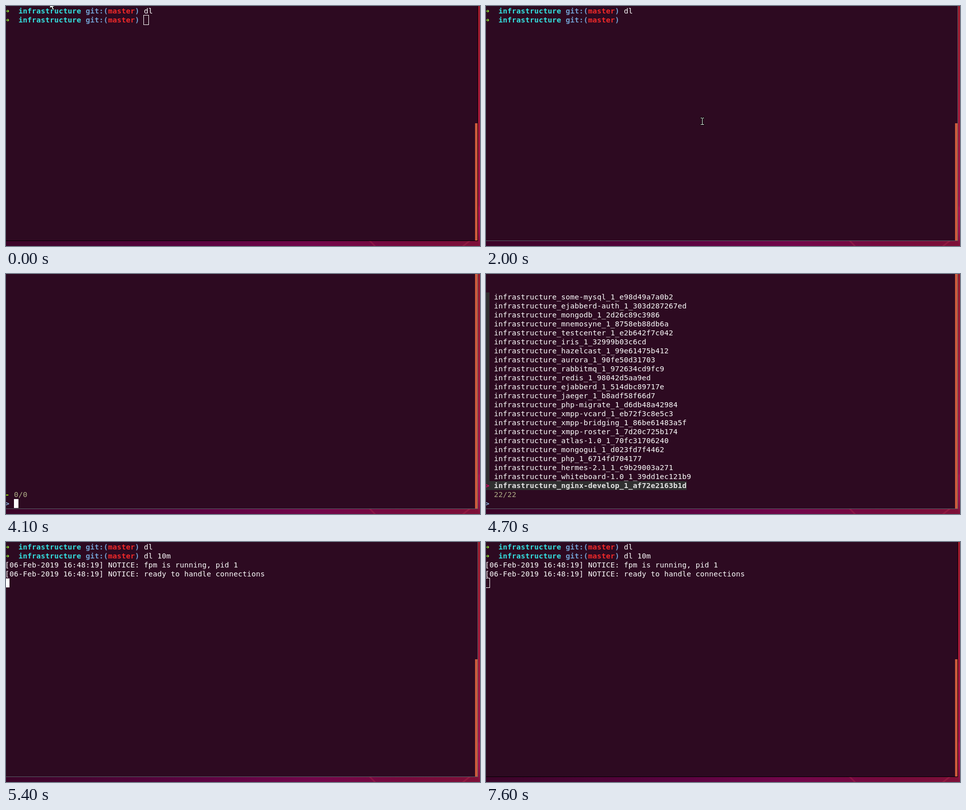
An HTML page with a canvas for the animation above (7900 ms loop, 952 by 481 pixels).

```html
<!DOCTYPE html>
<html lang="en">
<head>
<meta charset="utf-8">
<title>Terminal session</title>
<style>
  html, body { margin: 0; width: 100%; height: 100%; overflow: hidden; background: #2d0a21; }
  canvas { display: block; }
</style>
</head>
<body>
<canvas id="stage" width="952" height="481"></canvas>
<script>
const ctx = document.getElementById('stage').getContext('2d');
const LOOP = 7900, STEP = 100;
const CELL = 9, ROW = 18, LEFT = -2, TOP = 1;
const FONT = '14.667px "DejaVu Sans Mono", "DejaVu Sans", monospace';
const BG = '#2d0a21', WHITE = '#ffffff', GREY = '#303030';
const GREEN = '#8ae234', CYAN = '#34e2e2', BLUE = '#729fcf', RED = '#ef2929';
const PREFIX = 'infrastructure_';

// Nearest match comes first; the list grows upwards.
const containers = `nginx-develop_1_af72e2163b1d
whiteboard-1.0_1_39dd1ec121b9
hermes-2.1_1_c9b29003a271
php_1_6714fd704177
mongogui_1_d023fd7f4462
atlas-1.0_1_70fc31706240
xmpp-roster_1_7d20c725b174
xmpp-bridging_1_86be61483a5f
xmpp-vcard_1_eb72f3c8e5c3
php-migrate_1_d6db48a42984
jaeger_1_b8adf58f66d7
ejabberd_1_514dbc89717e
redis_1_98042d5aa9ed
rabbitmq_1_972634cd9fc9
aurora_1_90fe50d31703
hazelcast_1_99e61475b412
iris_1_32999b03c6cd
testcenter_1_e2b642f7c042
mnemosyne_1_8758eb88db6a
mongodb_1_2d26c89c3986
ejabberd-auth_1_303d287267ed
some-mysql_1_e98d49a7a0b2`.split('\n');

const command = [[0, ''], [2100, 'd'], [2300, 'dl'], [2400, 'dl '], [2700, 'dl 21'],
  [3000, 'dl 21m'], [3300, 'dl 21'], [3400, 'dl 2'], [3600, 'dl '], [3700, 'dl 1'],
  [3800, 'dl 10'], [3900, 'dl 10m']];
const query = [[0, ''], [4900, 'p'], [5100, 'php']];
const blinkOff = [[2000, 2100], [4700, 4900], [5900, 6500], [7100, 7500]];

const valueAt = (keys, t) => keys.filter(([start]) => start <= t).pop()[1];
const within = (t, from, to) => t >= from && t < to;
const isFocused = t => within(t, 1400, 7500);

function rect(x, y, w, h, color) {
  ctx.fillStyle = color;
  ctx.fillRect(x, y, w, h);
}

function cells(col, row, count, color) {
  rect(LEFT + col * CELL, TOP + row * ROW, count * CELL, ROW, color);
}

function write(text, col, row, color, bold = false) {
  ctx.font = (bold ? 'bold ' : '') + FONT;
  ctx.fillStyle = color;
  [...text].forEach((ch, i) =>
    ctx.fillText(ch, LEFT + (col + i) * CELL, TOP + row * ROW + 14));
}

function gradient(x, y, stops) {
  const g = ctx.createLinearGradient(0, 0, x, y);
  stops.forEach(([at, color]) => g.addColorStop(at, color));
  return g;
}

function drawDesktop() {
  rect(0, 470, 952, 11, gradient(952, 0, [[0, '#3a0428'], [.4, '#5a0340'],
    [.65, '#72064a'], [.85, '#760a3c'], [1, '#7d1038']]));
  rect(948, 0, 4, 481, gradient(0, 481, [[0, '#9c1a2c'], [.5, '#a4173a'],
    [.83, '#a2124a'], [.84, '#b0144e'], [.94, '#a0104a'], [1, '#7d1038']]));
  ctx.strokeStyle = 'rgba(190, 50, 80, .3)';
  ctx.lineWidth = 3;
  ctx.beginPath();
  ctx.moveTo(730, 470);
  ctx.lineTo(742, 482);
  ctx.moveTo(932, 470);
  ctx.lineTo(917, 482);
  ctx.stroke();
}

function drawWindow(focused, fullScroll) {
  rect(0, 0, 948, 471, focused ? '#565f66' : '#000000');
  rect(0, 0, 947, 470, BG);
  const top = fullScroll ? 0 : 235;
  rect(942, top, 5, 470 - top, '#cb5b3b');
}

function drawCursor(t, col, row) {
  if (!isFocused(t)) {
    ctx.strokeStyle = WHITE;
    ctx.lineWidth = 1;
    ctx.strokeRect(LEFT + col * CELL - .5, TOP + row * ROW - .5, CELL + 1, ROW + 1);
  } else if (!blinkOff.some(([from, to]) => within(t, from, to))) {
    cells(col, row, 1, WHITE);
  }
}

function drawPrompt(row, text) {
  write('➜', 0, row, GREEN, true);
  write('infrastructure', 3, row, CYAN, true);
  write('git:(', 18, row, BLUE, true);
  write('master', 23, row, RED, true);
  write(')', 29, row, BLUE, true);
  write(text, 31, row, WHITE);
}

function drawShell(t) {
  const text = valueAt(command, t);
  drawPrompt(0, 'dl');
  drawPrompt(1, text);
  if (t < 5400) return drawCursor(t, 31 + text.length, 1);
  const stamp = '[06-Feb-2019 16:48:19] NOTICE: ';
  write(stamp + 'fpm is running, pid 1', 0, 2, WHITE);
  write(stamp + 'ready to handle connections', 0, 3, WHITE);
  drawCursor(t, 0, 4);
}

function search(text) {
  const found = containers.filter(name => name.includes(text));
  if (!text) return found;
  const rank = name => (name.startsWith(text) ? 0 : 100) + name.length;
  return found.sort((a, b) => rank(a) - rank(b));
}

function drawFinder(t) {
  const text = valueAt(query, t);
  const loading = t < 4200;
  const found = loading ? [] : search(text);
  found.forEach((name, i) => {
    const row = 23 - i, current = i === 0, line = PREFIX + name;
    cells(0, row, current ? line.length + 2 : 1, GREY);
    if (current) write('>', 0, row, '#d7005f', true);
    const from = line.indexOf(text), to = from + text.length;
    const color = current ? '#e4e4e4' : WHITE;
    write(line.slice(0, from), 2, row, color, current);
    write(text, 2 + from, row, current ? '#afd7af' : '#87af87', current);
    write(line.slice(to), 2 + to, row, color, current);
  });
  if (loading) write('-', 0, 24, '#9bdc10', true);
  write(loading ? '0/0' : `${found.length}/${containers.length}`, 2, 24, '#afaf87');
  write('>', 0, 25, '#87afd7', true);
  write(text, 2, 25, WHITE, true);
  drawCursor(t, 2 + text.length, 25);
}

function drawArrow(x, y) {
  const outline = [[0, 0], [0, 14], [3, 11], [6, 17], [8.5, 16], [6, 10.5], [10, 10.5]];
  ctx.beginPath();
  outline.forEach(([dx, dy]) => ctx.lineTo(x + dx, y + dy));
  ctx.closePath();
  ctx.lineWidth = 1;
  ctx.strokeStyle = '#000000';
  ctx.fillStyle = WHITE;
  ctx.fill();
  ctx.stroke();
}

function drawBeam(x, y) {
  const bars = [[0, -6, 1, 13], [-3, -7, 3, 1], [1, -7, 3, 1], [-3, 6, 3, 1], [1, 6, 3, 1]];
  for (const [dx, dy, w, h] of bars) rect(x + dx - 1, y + dy - 1, w + 2, h + 2, '#000000');
  for (const [dx, dy, w, h] of bars) rect(x + dx, y + dy, w, h, WHITE);
}

function drawPointer(t) {
  if (t < 1300) drawArrow(88, -9);
  else if (t < 1400) drawBeam(48, 8);
  else if (t < 2000) drawBeam(8, 20);
  else if (t < 2100) drawBeam(434, 231);
  else if (within(t, 6800, 7500)) {
    const p = (t - 6800) / 600, ease = p * p * (3 - 2 * p);
    drawBeam(Math.round(434 - 368 * ease), Math.round(231 - 225 * ease));
  } else if (within(t, 7500, 7600)) drawArrow(58, -9);
}

function draw(now) {
  const t = Math.floor(now % LOOP / STEP) * STEP;
  const finding = within(t, 4100, 5400);
  drawDesktop();
  drawWindow(isFocused(t), finding);
  (finding ? drawFinder : drawShell)(t);
  drawPointer(t);
}

const start = performance.now();
function tick() {
  draw(performance.now() - start);
  requestAnimationFrame(tick);
}
tick();
</script>
</body>
</html>
```
